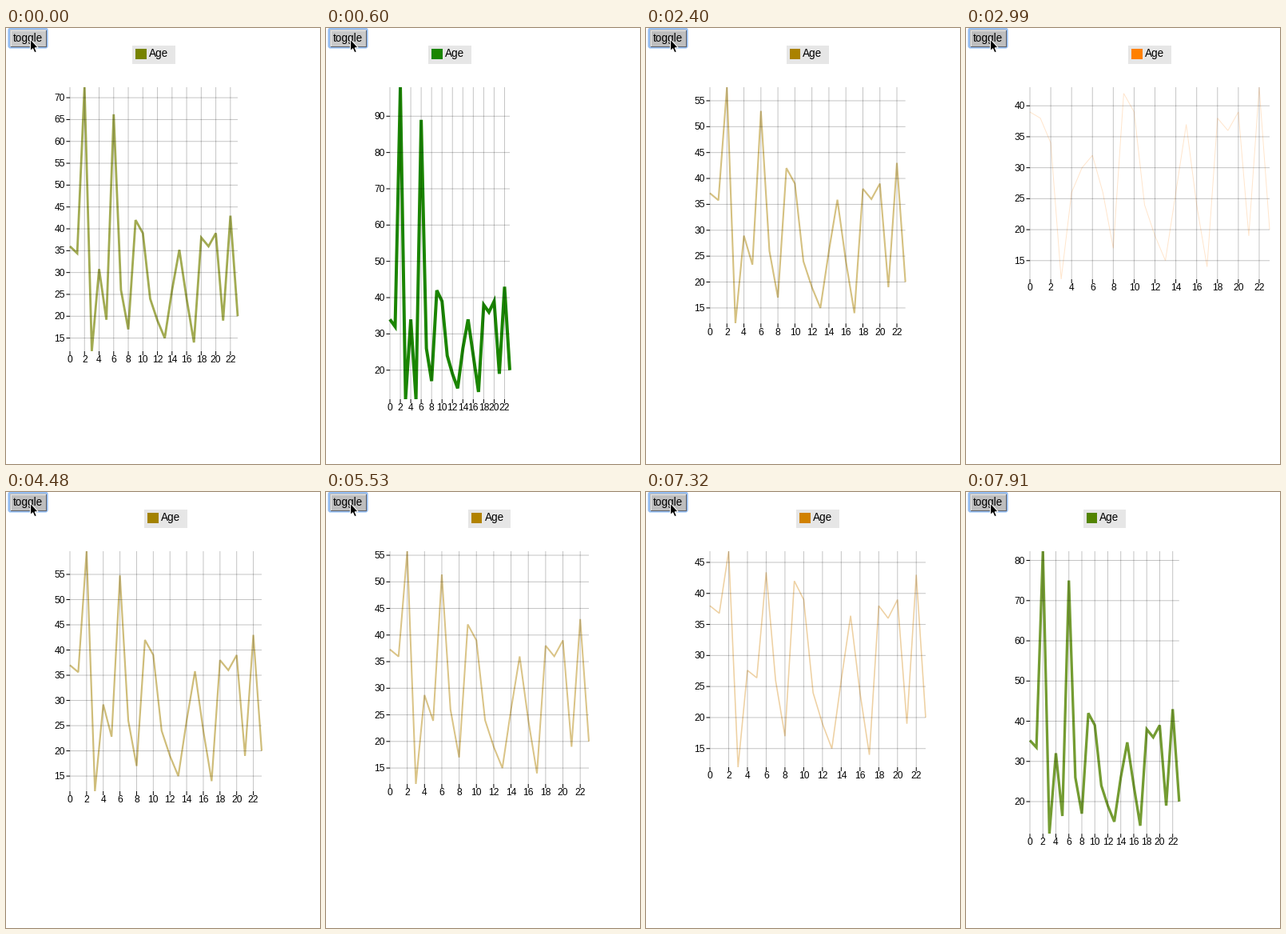
Animation of 393x545 px, one loop 8000 ms. Source, as a matplotlib script:

```python
import numpy as np
import matplotlib.pyplot as plt
from matplotlib.animation import FuncAnimation
from matplotlib.collections import LineCollection
from matplotlib.patches import FancyBboxPatch, Polygon, Rectangle
from matplotlib.path import Path

STAGE_W, STAGE_H, DPI = 393, 545, 100
LOOP, TICK, REFRESH = 8000, 40, 150
PX = 72 / DPI
LEFT, TOP = 80, 74

ages = np.array([39, 38, 34, 12, 26, 30, 32, 26, 17, 42, 39, 24,
                 19, 15, 26, 37, 24, 14, 38, 36, 39, 19, 43, 20], float)
growth = np.zeros(24)
growth[:7] = -5, -6, 64, 0, 8, -18, 57
growth[15] = -3
ORANGE = np.array([255, 128, 0]) / 255
GREEN = np.array([26, 133, 0]) / 255

# Tweens between wide (0) and tall (1): start ms, end ms, from, to, change per second.
TWEENS = [(0, 750, .6, 1, .94), (1800, 2990, .933, 0, -.94), (4040, 4480, .12, .4, .94),
          (5530, 6270, .34, .08, -.4), (7320, 7910, .2, 1, .94)]

plt.rcParams["font.family"] = "Liberation Sans"
fig = plt.figure(figsize=(STAGE_W / DPI, STAGE_H / DPI), dpi=DPI, facecolor="white")
ax = fig.add_axes([0, 0, 1, 1])
ax.set_xlim(0, STAGE_W)
ax.set_ylim(STAGE_H, 0)
ax.axis("off")


def label(x, y, text, size, ha="left"):
    return ax.text(x, y, text, fontsize=size * PX, ha=ha, va="baseline", zorder=5)


def box(x, y, w, h, color, z=1):
    return ax.add_patch(Rectangle((x, y), w, h, fc=color, lw=0, zorder=z))


def strokes(color):
    lines = LineCollection([], colors=[color], linewidths=PX, zorder=4)
    lines.set_snap(False)
    return ax.add_collection(lines, autolim=False)


def draw_button():
    ax.add_patch(FancyBboxPatch((5, 2), 45, 21, boxstyle="round,pad=1.3,rounding_size=2",
                                fc="white", ec="#94bdf2", lw=2.6 * PX))
    face = box(5, 2, 45, 21, "#bebebe", 2)
    ax.plot([5.5, 5.5, 49.5], [22.5, 2.5, 2.5], color="#e6e6e6", lw=PX, zorder=3)
    ax.plot([5.5, 49.5, 49.5], [22.5, 22.5, 2.5], color="#5c5f66", lw=PX, zorder=3)
    label(27.8, 17.4, "toggle", 13.5, "center")
    arrow = [(30.5, 14), (30.5, 28.6), (33.6, 25.7), (35.8, 30.8),
             (38.3, 29.7), (36.1, 24.8), (40.2, 24.6)]
    ax.add_patch(Polygon(arrow, fc="black", ec="white", lw=PX, zorder=8))
    return face


face = draw_button()
legend = box(0, 22, 53.6, 23, "#e6e6e6")
swatch = box(0, 26, 13.6, 13, ORANGE, 2)
title = label(0, 36, "Age", 13.5)
curve, = ax.plot([], [], solid_joinstyle="miter", solid_capstyle="butt", zorder=3)
grid = strokes((0, 0, 0, .23))
ticks = strokes("black")
x_values = np.arange(0, 23, 2)
x_labels = [label(0, 0, str(v), 12, "center") for v in x_values]
y_labels = [label(74, 0, "", 12, "right") for _ in range(15)]


def tween(now):
    """Layout mix and whether the button is lit, refreshed in coarse steps."""
    start, end, first, goal, rate = [w for w in TWEENS if w[0] <= now][-1]
    t = end if now >= end else now - (now - start) % REFRESH
    u = first + rate * (t - start) / 1000
    u = min(u, goal) if rate > 0 else max(u, goal)
    return u, t == 0 or (u == goal and t < end)


def update(i):
    u, lit = tween(i * TICK + TICK - 1)
    w, h = 300 - 150 * u, 240 + 150 * u
    right, bottom = LEFT + w, TOP + h
    data = ages + growth * u
    low, high = data.min(), data.max()
    color = ORANGE + (GREEN - ORANGE) * u

    def sx(v):
        return LEFT + v * w / 23

    def sy(v):
        return bottom - (v - low) * h / (high - low)

    curve.set_data(sx(np.arange(24)), sy(data))
    curve.set(color=color, alpha=.2 + .8 * u, linewidth=(1 + 3 * u) * PX)
    frame = Path([(0, TOP), (STAGE_W, TOP), (STAGE_W, bottom), (0, bottom), (0, TOP)])
    curve.set_clip_path(frame, ax.transData)

    step = 10 if 10 / (high - low) <= .15 else 5
    y_values = np.arange(np.ceil(low / step) * step, high + 1e-6, step)
    xs, ys = sx(x_values), sy(y_values)
    grid.set_segments([[(x, TOP), (x, bottom)] for x in xs]
                      + [[(LEFT, y), (right, y)] for y in ys])
    ticks.set_segments([[(x, bottom), (x, bottom + 5)] for x in xs]
                       + [[(LEFT - 4.5, y), (LEFT, y)] for y in ys])
    for text, x in zip(x_labels, xs):
        text.set_position((x, bottom + 14.3))
    for k, text in enumerate(y_labels):
        text.set_visible(k < len(ys))
        if k < len(ys):
            text.set_text(f"{y_values[k]:.0f}")
            text.set_y(ys[k] + 4)

    mid = LEFT + w / 2
    legend.set_x(mid - 26.8)
    swatch.set_x(mid - 22.8)
    swatch.set_facecolor(color)
    title.set_x(mid - 6)
    face.set_facecolor("#c9c9c9" if lit else "#bebebe")
    return []


anim = FuncAnimation(fig, update, frames=LOOP // TICK, interval=TICK,
                     repeat=True, repeat_delay=0, blit=False)
plt.show()
```
